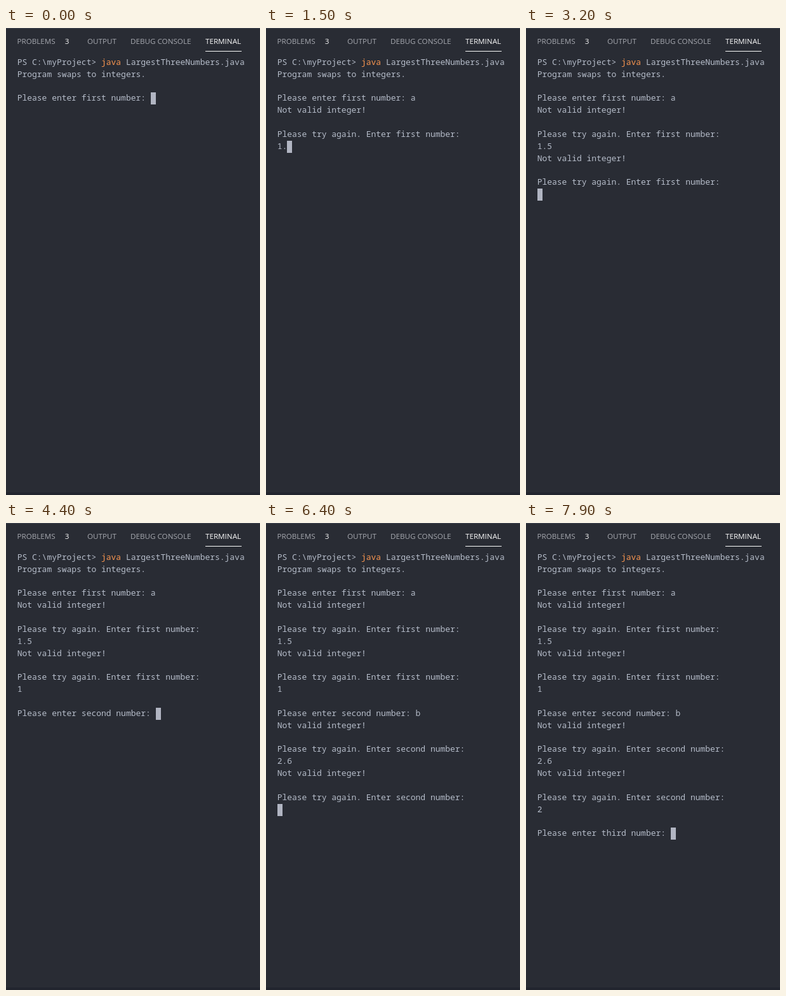
An HTML page that plays this animation: 400x733 px, repeating every 8000 ms.

```html
<!DOCTYPE html>
<html lang="en">
<head>
<meta charset="utf-8">
<title>Terminal session</title>
<style>
  html, body { margin: 0; width: 100%; height: 100%; overflow: hidden; background: #292c34; }
  svg { display: block; width: 100%; height: 100%; }
  text { white-space: pre; }
  .tabs { font: 11.65px "Open Sans", "Noto Sans", sans-serif; fill: #a6a8af; }
  .tabs .active { fill: #fafafa; }
  .screen { font: 500 12.98px "Noto Sans Mono", monospace; fill: #b6bdca; font-variant-ligatures: none; }
  .command { fill: #f8954f; }
</style>
</head>
<body>
<svg viewBox="0 0 400 733">
  <rect width="400" height="733" fill="#292c34"/>
  <rect width="400" height="1" fill="#3c414c"/>
  <rect y="729" width="400" height="4" fill="#22252e"/>
  <g class="tabs">
    <text x="17.5" y="25">PROBLEMS</text>
    <text class="active" x="92.7" y="25">3</text>
    <text x="128" y="25">OUTPUT</text>
    <text x="196" y="25">DEBUG CONSOLE</text>
    <text class="active" x="314" y="25">TERMINAL</text>
    <rect class="active" x="314" y="36" width="57" height="1"/>
  </g>
  <g class="screen" id="screen">
    <text x="17.7" y="58">PS C:\myProject&gt; <tspan class="command">java</tspan> LargestThreeNumbers.java</text>
  </g>
  <rect id="cursor" width="8" height="19" fill="#b1b5c2"/>
</svg>
<script>
const LOOP = 8000;
const LEFT = 17.7, TOP = 44.7, ROW = 18.85, COL = 7.788;
const ROWS = 23;

const retry = which =>
  `\nNot valid integer!\n\nPlease try again. Enter ${which} number:\n`;
const ask = which => `Please enter ${which} number: `;

// Each entry appends its text to the output at the given time.
const session = [
  [0, "Program swaps to integers.\n\n" + ask("first")],
  [500, "a"],
  [900, retry("first")],
  [1300, "1"],
  [1500, "."],
  [1700, "5"],
  [2300, retry("first")],
  [3400, "1"],
  [3700, "\n\n" + ask("second")],
  [4600, "b"],
  [5000, retry("second")],
  [5600, "2"],
  [5800, "."],
  [6000, "6"],
  [6300, retry("second")],
  [7000, "2"],
  [7500, "\n\n" + ask("third")]
];

const screen = document.getElementById("screen");
const cursor = document.getElementById("cursor");
const rowTop = i => Math.round(TOP + i * ROW);

const rows = Array.from({ length: ROWS }, (_, i) => {
  const row = document.createElementNS(screen.namespaceURI, "text");
  row.setAttribute("x", LEFT);
  row.setAttribute("y", rowTop(i + 1) + 13);
  return screen.appendChild(row);
});

let shown = 0;

function draw(now) {
  const time = now % LOOP;
  const count = session.filter(([start]) => start <= time).length;
  if (count !== shown) {
    shown = count;
    const lines = session.slice(0, count).map(([, text]) => text).join("").split("\n");
    rows.forEach((row, i) => row.textContent = lines[i] || "");
    cursor.setAttribute("x", Math.round(LEFT + lines[lines.length - 1].length * COL));
    cursor.setAttribute("y", rowTop(lines.length));
  }
}

function tick() {
  draw(performance.now());
  requestAnimationFrame(tick);
}
tick();
</script>
</body>
</html>
```
